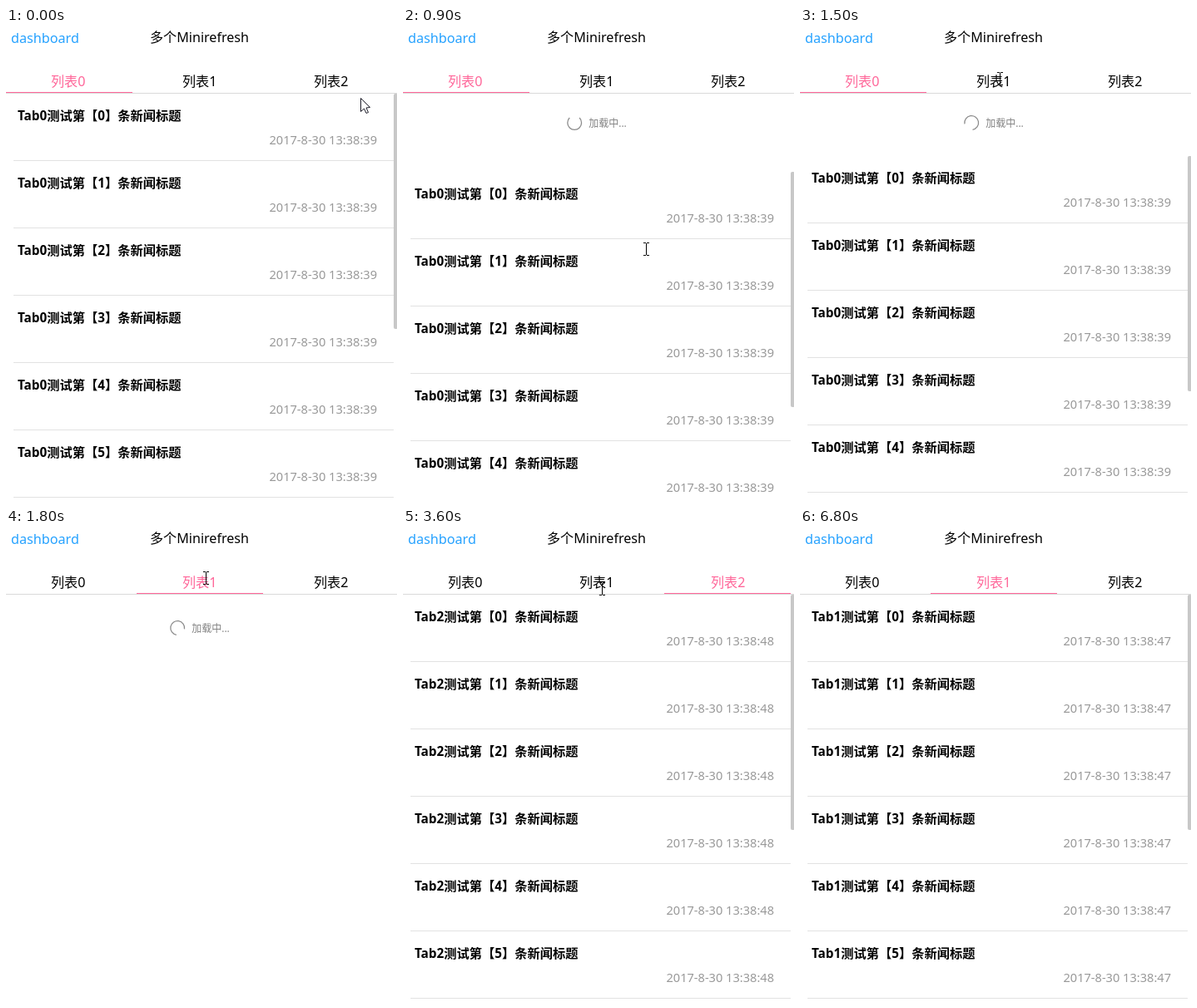
Recreate the animation shown at these times as an HTML page with a canvas. Size 470 by 569 pixels, loop 7300 ms.

```html
<!DOCTYPE html>
<html lang="zh-CN">
<head>
<meta charset="utf-8">
<style>
  html, body { margin: 0; width: 100%; height: 100%; overflow: hidden; background: #fff; }
  canvas { display: block; font-kerning: none; }
</style>
</head>
<body>
<canvas id="stage" width="470" height="569"></canvas>
<script>
const ctx = document.getElementById('stage').getContext('2d');
const LOOP = 7300, STEP = 100;
const TOP = 79, ROW = 81, WRAP = 75, MAX_PULL = 118, FIRST_PULL = 80;
const PRESS = 200, RELEASE = 800, LOAD = 500, SETTLE = 200;
const PINK = '#ff6699';
const FONT = '"Noto Sans", "Noto Sans CJK SC", "Noto Sans CJK", sans-serif';

const visits = [
  { at: 0, tab: 0 },
  { at: 1700, tab: 1, first: true },
  { at: 2700, tab: 2, first: true },
  { at: 3900, tab: 1 },
  { at: 4600, tab: 0 },
  { at: 5500, tab: 2 },
  { at: 6400, tab: 1 }
];
const pointerStart = { x: 426, y: 84 };
const pointerMoves = [
  { from: 0, to: 600, x: 322, y: 370 },
  { from: 800, to: 1300, x: 239, y: 80 },
  { from: 1300, to: 1600, x: 240, y: 59 },
  { from: 2000, to: 2500, x: 388, y: 70 },
  { from: 2900, to: 3600, x: 239, y: 72 },
  { from: 4000, to: 4400, x: 81, y: 61 },
  { from: 4800, to: 5300, x: 408, y: 58 },
  { from: 5500, to: 6100, x: 243, y: 62 }
];
const POINTER_EXIT = 6700;

const clamp = k => Math.min(1, Math.max(0, k));
const progress = (t, from, to) => clamp((t - from) / (to - from));
const easeOut = k => 1 - (1 - k) ** 2;
const mix = (a, b, k) => a + (b - a) * k;
const labelX = tab => 54 + 158 * tab;

function pullAt(t, visit) {
  const age = t - visit.at;
  if (visit.first) return FIRST_PULL * (1 - easeOut(progress(age, LOAD, LOAD + SETTLE)));
  if (visit.at > 0) return 0;
  if (t <= RELEASE) return MAX_PULL * easeOut(progress(t, PRESS, 600));
  return mix(MAX_PULL, WRAP, easeOut(progress(t, RELEASE, RELEASE + 300)));
}

function pointerAt(t) {
  let { x, y } = pointerStart;
  for (const move of pointerMoves) {
    const k = easeOut(progress(t, move.from, move.to));
    x = mix(x, move.x, k);
    y = mix(y, move.y, k);
  }
  return { x: Math.round(x), y: Math.round(y) };
}

function overText({ x, y }) {
  const onLabel = [0, 1, 2].some(i => x >= labelX(i) && x <= labelX(i) + 42);
  return y > 100 || (y < 76 && onLabel);
}

function text(str, x, y, size, color, weight = 400, align = 'left') {
  ctx.font = `${weight} ${size}px ${FONT}`;
  ctx.textAlign = align;
  ctx.fillStyle = color;
  ctx.fillText(str, x, y);
}

function rect(x, y, w, h, color) {
  ctx.fillStyle = color;
  ctx.fillRect(x, y, w, h);
}

function drawHeader(tab) {
  rect(0, 0, 470, TOP, '#fff');
  text('dashboard', 6, 18, 16.2, '#26a2ff');
  text('多个Minirefresh', 173, 17, 16.1, '#000');
  rect(0, 78, 470, 1, '#d9d9d9');
  for (let i = 0; i < 3; i++) text('列表' + i, labelX(i), 70, 16.1, i === tab ? PINK : '#000');
  rect(157 * tab, 77, 152, 1, PINK);
}

function drawIndicator(label, y, turn) {
  ctx.font = `12px ${FONT}`;
  const left = 233 - (ctx.measureText(label).width + 26) / 2;
  text(label, left + 26, y + 4.5, 12, '#808080');
  ctx.strokeStyle = '#8c8c8c';
  ctx.lineWidth = 1.3;
  ctx.beginPath();
  ctx.arc(left + 9, y, 8.4, turn + Math.PI * 0.75, turn + Math.PI * 2.25);
  ctx.stroke();
}

function drawList(tab, second, pull, pressed) {
  const top = TOP + pull;
  rect(0, top, 470, 569 - top, '#fff');
  if (pressed) rect(0, top, 466, 80, '#f5f5f5');
  for (let i = 0; i < 6; i++) {
    const y = top + i * ROW;
    text(`Tab${tab}测试第【${i}】条新闻标题`, 14, y + 32, 15.25, '#000', 700);
    text(`2017-8-30 13:38:${second}`, 446, y + 61, 14.6, '#999', 400, 'right');
    rect(9, y + 80, 457, 1, '#e2e2e2');
  }
  ctx.fillStyle = '#c8c8c8';
  ctx.beginPath();
  ctx.roundRect(466, top, 5, 283, 2);
  ctx.fill();
}

function drawTextCursor() {
  rect(0, -7, 1, 14, '#000');
  for (const y of [-8, 7]) {
    rect(-3, y, 3, 1, '#000');
    rect(1, y, 3, 1, '#000');
  }
}

function drawArrow() {
  ctx.translate(0.5, 0.5);
  ctx.fillStyle = '#fff';
  ctx.strokeStyle = '#1c1c28';
  ctx.lineWidth = 1;
  const shape = new Path2D('M0 0V16L4 12.5L6.5 18L9 17L6.5 11.5L11 11Z');
  ctx.fill(shape);
  ctx.stroke(shape);
}

function drawPointer(t) {
  if (t > POINTER_EXIT) return;
  const p = pointerAt(t);
  ctx.save();
  ctx.translate(p.x, p.y);
  if (overText(p)) drawTextCursor();
  else drawArrow();
  ctx.restore();
}

function draw(t) {
  const visit = visits.findLast(v => v.at <= t);
  const { tab, first } = visit;
  const age = t - visit.at;
  const pull = Math.round(pullAt(t, visit));
  const loading = first || t > RELEASE;

  rect(0, 0, 470, 569, '#fff');
  if (pull > 0) {
    const label = loading ? '加载中...' : pull < WRAP ? '下拉刷新' : '释放刷新';
    const turns = loading ? (first ? age - 200 : age - 1400) / 1000 : pull / WRAP;
    drawIndicator(label, 39 + (first ? pull : Math.min(pull, WRAP)), turns * Math.PI * 2);
  }
  if (!first || age >= LOAD) {
    const second = visit.at ? 46 + tab : 39;
    drawList(tab, second, pull, visit.at === 0 && t >= PRESS && t <= RELEASE);
  }
  drawHeader(tab);
  drawPointer(t);
}

const start = performance.now();
function tick() {
  const t = (performance.now() - start) % LOOP;
  draw(Math.floor(t / STEP) * STEP);
  requestAnimationFrame(tick);
}
tick();
</script>
</body>
</html>
```
